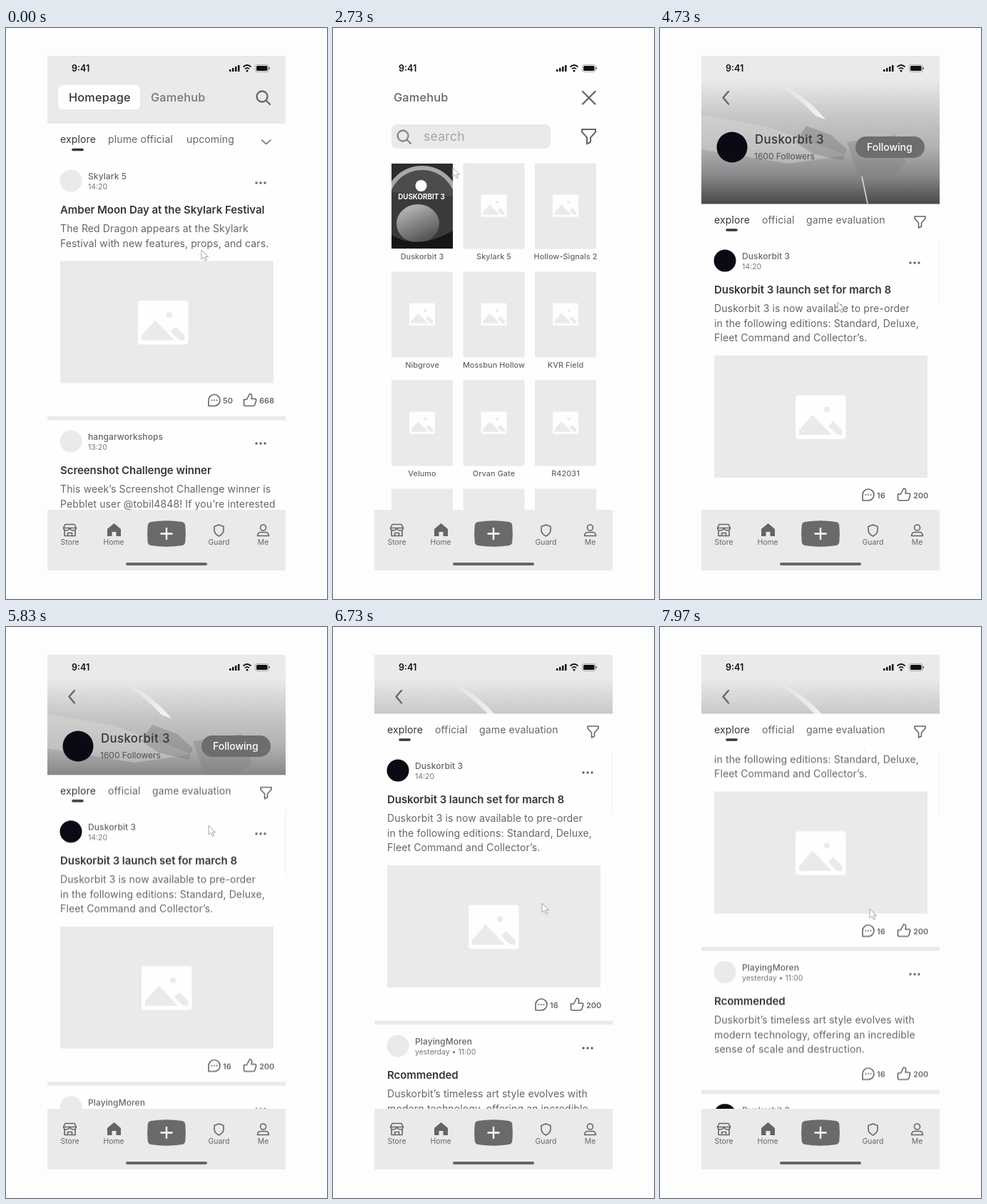
An HTML page for the animation above (8 s loop, 450x800 px).

```html
<!DOCTYPE html>
<html lang="en">
<head>
<meta charset="utf-8">
<title>Game community app</title>
<style>
  :root { --panel: #eaeaea; --page: #fefefe; --ink: #363636; --mid: #666; --soft: #777; --icon: #656565; }
  html, body { margin: 0; width: 100%; height: 100%; overflow: hidden; background: #fdfdfe; }
  svg { display: block; width: 100vw; height: 100vh; }
  text { font-family: Inter, "Open Sans", sans-serif; fill: var(--mid); }
  .head { font-size: 16.3px; font-weight: 500; letter-spacing: .2px; }
  .tab { font-size: 14px; letter-spacing: .15px; }
  .name { font-size: 12px; font-weight: 500; letter-spacing: .1px; }
  .small { font-size: 10.5px; }
  .count { font-size: 11px; font-weight: 600; }
  .title { font-size: 15px; font-weight: 600; letter-spacing: -.05px; }
  .body { font-size: 14px; letter-spacing: .12px; }
  .label { font-size: 10.8px; font-weight: 500; letter-spacing: .1px; text-anchor: middle; }
  .nav { font-size: 10.4px; text-anchor: middle; }
  .ink { fill: var(--ink); }
  .soft { fill: var(--soft); }
  .panel { fill: var(--panel); }
  .page { fill: var(--page); }
  .solid { fill: var(--icon); }
  .line { fill: none; stroke: var(--icon); stroke-width: 1.6; stroke-linecap: round; stroke-linejoin: round; }
  .thick { stroke-width: 2.3; }

  #hub, #detail, #collapse, #scroll, #cursor { animation: 8s linear infinite; }
  #hub { animation-name: show-hub; }
  #detail { animation-name: show-detail; }
  #collapse { animation-name: collapse; }
  #scroll { animation-name: scroll; }
  #cursor { animation-name: point; }

  @keyframes show-hub { 0%, 25.8% { opacity: 0; animation-timing-function: ease-out } 29.6%, 100% { opacity: 1 } }
  @keyframes show-detail { 0%, 47.1% { opacity: 0; animation-timing-function: ease-out } 50.8%, 100% { opacity: 1 } }
  @keyframes collapse {
    0%, 69.4% { transform: none; animation-timing-function: cubic-bezier(.35, 0, .4, 1) }
    80.6%, 100% { transform: translateY(-125px) }
  }
  @keyframes scroll {
    0%, 87.5% { transform: none; animation-timing-function: cubic-bezier(.35, 0, .4, 1) }
    98.7%, 100% { transform: translateY(-103.5px) }
  }
  @keyframes point {
    0%, .4% { transform: translate(274px, 311px); animation-timing-function: cubic-bezier(.2, .4, .55, 1) }
    16.6%, 27.5% { transform: translate(233px, 96px) }
    34.1% { transform: translate(168px, 195px); animation-timing-function: cubic-bezier(.3, .4, .65, 1) }
    41.6%, 50.8% { transform: translate(124px, 270px); animation-timing-function: ease-in-out }
    59.1% { transform: translate(249px, 384px); animation-timing-function: ease-in-out }
    69.4% { transform: translate(282px, 317px) }
    72.9% { transform: translate(284px, 278px); animation-timing-function: ease-out }
    75.5% { transform: translate(286px, 255px); animation-timing-function: ease-in-out }
    83.1%, 87.5% { transform: translate(293px, 387px) }
    91.2% { transform: translate(294px, 345px); animation-timing-function: ease-out }
    92.5% { transform: translate(294px, 336px); animation-timing-function: ease-in-out }
    99.6%, 100% { transform: translate(294px, 395px) }
  }
</style>
</head>
<body>
<svg viewBox="0 0 450 800">
  <defs>
    <g id="picture">
      <rect class="page" width="70.5" height="61.5" rx="4"/>
      <path class="panel" d="M5 55.500V49L24 27.500 43 47 51 55.500ZM45.500 43L53 36.500 65.500 49V55.500H58Z"/>
      <circle class="panel" cx="44" cy="20" r="4"/>
    </g>
    <g id="more" class="solid"><circle r="1.7"/><circle cx="6" r="1.7"/><circle cx="12" r="1.7"/></g>
    <g id="comment">
      <path class="line" d="M-8 8V0A8 8 0 1 1 0 8Z"/>
      <g class="solid"><circle cx="-3.500" r="1"/><circle r="1"/><circle cx="3.500" r="1"/></g>
    </g>
    <path id="thumb" class="line" d="M1 9H5L9 1C12 1 12.500 3 12 6L11.500 8H16C18 8 18.500 9 18 11L16.500 16C16 17.500 15.500 18 14 18H3C1.500 18 1 17 1 16Z"/>
    <path id="funnel" class="line" d="M0 0H15V3L9.500 9V14L5.500 16V9L0 3Z"/>
    <g id="glass" class="line thick"><circle cx="8" cy="8" r="7.500"/><path d="M13.500 13.500L19 19"/></g>
    <clipPath id="phone"><rect x="58" y="39" width="334" height="721"/></clipPath>
    <clipPath id="feed"><rect x="58" y="297" width="335" height="700"/></clipPath>
    <clipPath id="cover"><rect x="82" y="190" width="86" height="119"/></clipPath>
    <clipPath id="hero"><rect x="58" y="72" width="334" height="175"/></clipPath>
    <linearGradient id="sky" x2="0" y2="1">
      <stop offset="0" stop-color="#eaeaea"/>
      <stop offset=".28" stop-color="#c8c8c9"/>
      <stop offset=".55" stop-color="#b0b0b1"/>
      <stop offset=".78" stop-color="#868688"/>
      <stop offset="1" stop-color="#48484b"/>
    </linearGradient>
    <linearGradient id="beam" x2=".8" y2="1">
      <stop offset="0" stop-color="#f4f4f4" stop-opacity=".2"/>
      <stop offset="1" stop-color="#f4f4f4"/>
    </linearGradient>
    <linearGradient id="globe" x2=".5" y2="1">
      <stop offset="0" stop-color="#c6c6c6"/>
      <stop offset="1" stop-color="#555"/>
    </linearGradient>
  </defs>

  <g clip-path="url(#phone)">
    <rect class="page" x="58" y="39" width="334" height="721"/>

    <g id="home">
      <rect class="panel" x="58" y="39" width="334" height="95"/>
      <rect class="page" x="73" y="80" width="115" height="34" rx="6"/>
      <text class="head ink" x="88" y="103">Homepage</text>
      <text class="head soft" x="203" y="103">Gamehub</text>
      <use href="#glass" x="351" y="88"/>
      <path class="line" d="M358.500 157L364.700 162.500 371 157"/>
    </g>

    <g id="hub">
      <rect class="page" x="58" y="39" width="334" height="721"/>
      <text class="head" x="85" y="103">Gamehub</text>
      <path class="line thick" d="M350 89L367.500 106.500M367.500 89L350 106.500"/>
      <rect class="panel" x="82" y="135" width="223" height="34" rx="8"/>
      <use href="#glass" x="90" y="143" opacity=".75"/>
      <text x="127" y="158" font-size="17.500" style="fill:#a6a6a6;letter-spacing:.3px">search</text>
      <use href="#funnel" transform="translate(349 142) scale(1.270)"/>
    </g>

    <g id="detail">
      <rect class="panel" x="58" y="39" width="334" height="34"/>
      <g clip-path="url(#hero)">
        <rect x="58" y="72" width="334" height="175" fill="url(#sky)"/>
        <path d="M58 122L150 138 262 178 180 190 58 170Z" fill="#dcdcdc" opacity=".4"/>
        <path d="M164 78Q198 88 232 128L218 123Q195 98 164 78Z" fill="url(#beam)"/>
        <path d="M205 137L240 150 262 170 256 186 214 176 190 160Z" fill="#777" opacity=".4"/>
        <path d="M262 160L330 150 345 190 318 212 278 206Z" fill="#808082" opacity=".4"/>
        <path d="M283 208L291 246" stroke="#dedede" stroke-width="1.500"/>
      </g>
      <path class="line thick" d="M96 89L88.500 97.500 96 106.500"/>
      <circle cx="101" cy="167" r="21.500" fill="#0b0a14"/>
      <text class="ink" x="133" y="162" font-size="16.800" font-weight="500" letter-spacing=".4">Duskorbit 3</text>
      <text x="132" y="184" font-size="12" style="fill:#505050">1600 Followers</text>
      <rect x="274" y="152" width="97" height="30" rx="15" fill="#6d6d6e"/>
      <text x="290" y="172" font-size="14" font-weight="500" style="fill:#fefefe">Following</text>
      <g id="collapse">
        <rect class="page" x="58" y="246.500" width="334" height="640"/>
        <use href="#funnel" x="357" y="264"/>
        <path d="M392 298V387" stroke="#eaeaea" stroke-width="1.500"/>
        <g clip-path="url(#feed)"><g id="scroll"></g></g>
      </g>
    </g>

    <g id="status">
      <text x="92" y="61" font-size="12.500" font-weight="600" style="fill:#111">9:41</text>
      <g fill="#111">
        <path d="M313 58h2.500v3h-2.500zM317 56h2.500v5h-2.500zM321 54h2.500v7h-2.500zM325 52h2.500v9h-2.500z"/>
        <rect x="351" y="53" width="15.500" height="7" rx="1.500"/>
        <rect x="368.300" y="55" width="1.200" height="3"/>
        <circle cx="338" cy="60" r="1.500"/>
      </g>
      <rect x="349.500" y="51.500" width="18.500" height="10" rx="2.500" fill="none" stroke="#999" stroke-width=".8"/>
      <path d="M332.500 54.500Q338 49.500 343.500 54.500M335 57.300Q338 54.500 341 57.300" fill="none" stroke="#111" stroke-width="1.800"/>
    </g>

    <g id="nav">
      <rect class="panel" x="58" y="675" width="334" height="85"/>
      <path class="line" d="M83 695.500H96L98.500 700.500H80.500ZM80.500 700.500Q81 704 84.500 704 88 704 89.500 701 91 704 94.500 704 98 704 98.500 700.500M82 704.500V711.500H97V704.500M86.500 711V707.500H92.500V711"/>
      <path class="solid" d="M151.500 694L161 702V712H154.500V706H148.500V712H142V702Z"/>
      <path d="M203 692Q225 688.500 247 692 251 693 251.300 697 252.500 709 251.300 720 251 724 247 725 225 728.500 203 725 199 724 198.700 720 197.500 709 198.700 697 199 693 203 692Z" fill="#6a6a6a"/>
      <path d="M225 700V717M216.500 708.500H233.500" stroke="#fefefe" stroke-width="2.400"/>
      <path class="line" d="M298.500 696L305 698.500V704Q304.500 709 298.500 712 292.500 709 292 704V698.500Z"/>
      <circle class="line" cx="360.500" cy="700" r="4"/>
      <path class="line" d="M352.500 711.500Q353 706.500 357 706.500H364Q368 706.500 368.500 711.500Z"/>
      <path d="M170 751H280" stroke="#666" stroke-width="4" stroke-linecap="round"/>
    </g>
  </g>
  <path id="cursor" d="M0 0V13L3.200 10.200 5.500 15 7.600 14 5.400 9.400H9.600Z" fill="#fefefe" stroke="#9a9a9a" stroke-width=".9"/>
</svg>
<script>
  const add = (id, markup) => document.getElementById(id).insertAdjacentHTML('beforeend', markup);
  const text = (cls, x, y, words) => `<text class="${cls}" x="${x}" y="${y}">${words}</text>`;

  const tabs = (y, items) => items.map(([x, word], i) => text(i ? 'tab' : 'tab ink', x, y, word)).join('') +
    `<path d="M94 ${y + 9.5}H107" stroke="#363636" stroke-width="3.600" stroke-linecap="round"/>`;

  // y is the centre of the avatar; the rest of the post hangs below it.
  function post(y, p) {
    const bodyEnd = 72 + 20.5 * p.lines.length;
    const actions = bodyEnd + (p.picture ? 194.5 : 9);
    const picture = p.picture ? `<rect class="panel" x="76" y="${bodyEnd - .5}" width="299" height="171"/>
      <use href="#picture" x="${p.picture}" y="${bodyEnd + 55}"/>` : '';
    return `<g transform="translate(0 ${y})">
      <circle cx="91" r="15.500" fill="${p.avatar || '#eaeaea'}"/>
      ${text('name', 115, -2, p.name)}${text('small soft', 115, 12, p.time)}
      <use href="#more" x="351" y="3"/>
      ${text('title ink', 76, 46, p.title)}
      ${p.lines.map((words, i) => text('body', 76, 72 + 20.5 * i, words)).join('')}
      ${picture}
      <use href="#comment" x="292" y="${actions}"/>${text('count', 304, actions + 4.500, p.comments)}
      <use href="#thumb" x="332.500" y="${actions - 10}"/>${text('count', 355, actions + 4.500, p.likes)}
      <rect class="panel" x="58" y="${actions + 22.500}" width="334" height="5.500"/>
    </g>`;
  }

  add('home', tabs(161, [[76, 'explore'], [143, 'plume official'], [253, 'upcoming']]) +
    post(214, {
      name: 'Skylark 5', time: '14:20', title: 'Amber Moon Day at the Skylark Festival',
      lines: ['The Red Dragon appears at the Skylark', 'Festival with new features, props, and cars.'],
      picture: 185, comments: 50, likes: 668
    }) +
    post(579, {
      name: 'hangarworkshops', time: '13:20', title: 'Screenshot Challenge winner',
      lines: ['This week’s Screenshot Challenge winner is', 'Pebblet user @tobil4848! If you’re interested'],
      picture: 185, comments: 50, likes: 668
    }));

  const games = ['Duskorbit 3', 'Skylark 5', 'Hollow-Signals 2', 'Nibgrove', 'Mossbun Hollow', 'KVR Field',
    'Velumo', 'Orvan Gate', 'R42031', '', '', ''];
  add('hub', games.map((game, i) => {
    const x = 82 + i % 3 * 100.5, y = 189.5 + Math.floor(i / 3) * 152;
    return `<rect class="panel" x="${x}" y="${y}" width="86" height="120"/>
      <use href="#picture" transform="translate(${x + 25} ${y + 44}) scale(.51)"/>
      ${text('label', x + 43, y + 134.5, game)}`;
  }).join('') + `<g clip-path="url(#cover)">
      <rect x="82" y="190" width="86" height="120" fill="#2c2c2c"/>
      <circle cx="125" cy="246" r="50" fill="#4c4c4c" stroke="#a8a8a8" stroke-width="6"/>
      <path d="M82 230L168 236V309H82Z" fill="#3a3a3a"/>
      <ellipse cx="119" cy="274" rx="30" ry="27" fill="url(#globe)"/>
      <path d="M82 290Q120 312 168 284V310H82Z" fill="#161616"/>
      <circle cx="123.500" cy="221" r="8" fill="#fefefe"/>
      <text x="124" y="240" text-anchor="middle" font-size="9.800" font-weight="700" style="fill:#fefefe">DUSKORBIT 3</text>
    </g>`);

  add('collapse', tabs(273.5, [[76, 'explore'], [143, 'official'], [205, 'game evaluation']]));
  const launch = {
    name: 'Duskorbit 3', time: '14:20', title: 'Duskorbit 3 launch set for march 8', avatar: '#0b0a14',
    lines: ['Duskorbit 3 is now available to pre-order', 'in the following editions: Standard, Deluxe,',
      'Fleet Command and Collector’s.'],
    picture: 190, comments: 16, likes: 200
  };
  add('scroll', post(326, launch) +
    post(712, {
      name: 'PlayingMoren', time: 'yesterday • 11:00', title: 'Rcommended',
      lines: ['Duskorbit’s timeless art style evolves with', 'modern technology, offering an incredible',
        'sense of scale and destruction.'],
      comments: 16, likes: 200
    }) +
    post(912, launch));

  const places = [[89.5, 'Store'], [151, 'Home'], [298.5, 'Guard'], [360.5, 'Me']];
  add('nav', places.map(([x, word]) => text('nav', x, 724, word)).join(''));
</script>
</body>
</html>
```
